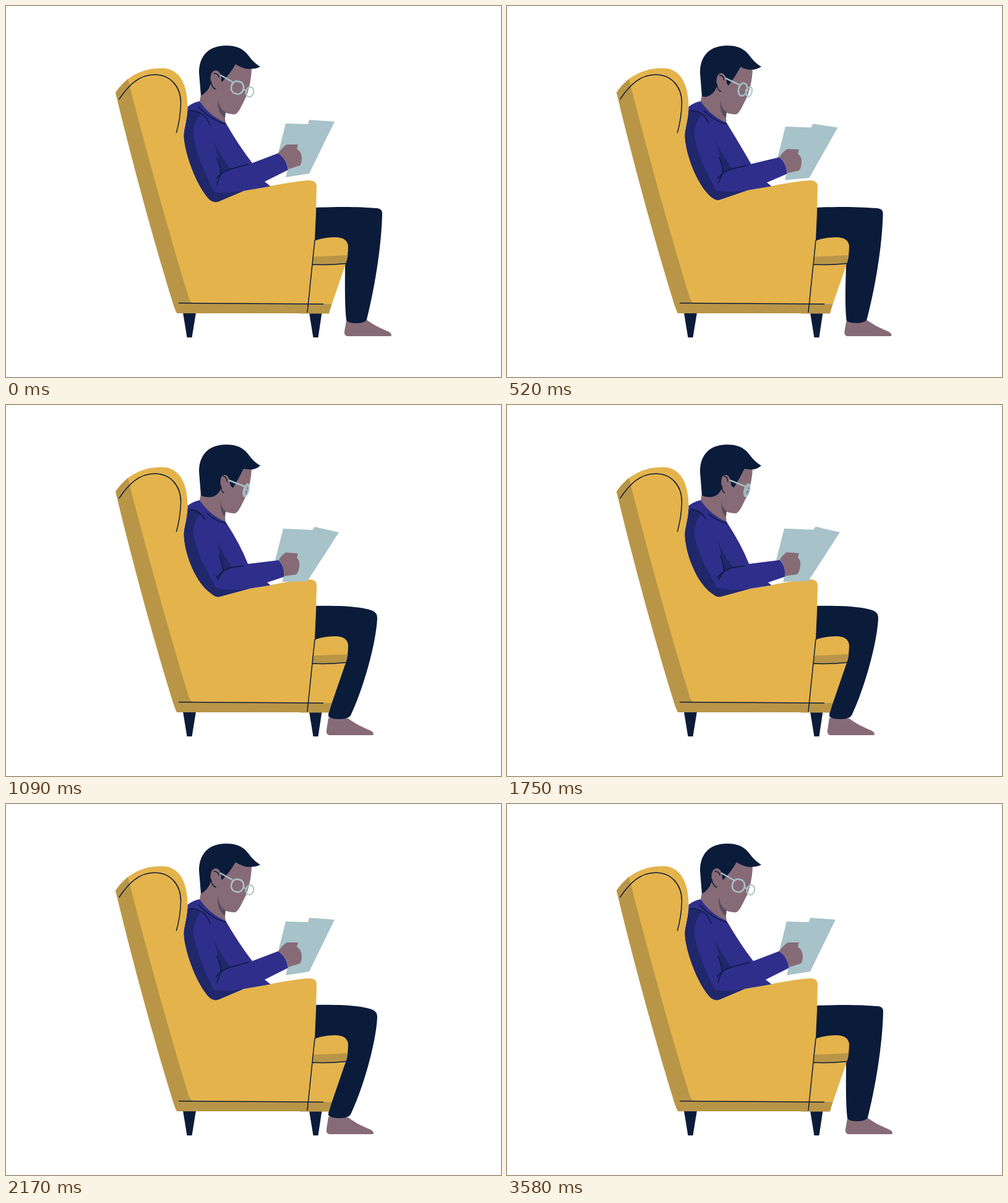
Write an HTML page that moves like this. It is 800 px wide and 600 px high and loops after 3.7 s.

```html
<!DOCTYPE html>
<html lang="en">
<head>
<meta charset="utf-8">
<title>Reading in an armchair</title>
<style>
  html, body { margin: 0; width: 100%; height: 100%; overflow: hidden; background: #fff; }
  svg { display: block; width: 100vw; height: 100vh; }
</style>
</head>
<body>
<svg id="stage" viewBox="0 0 800 600"></svg>
<script>
const LOOP = 3700;
const NAVY = '#0b1b3a', YELLOW = '#e4b34c', OCHRE = '#b99647', SKIN = '#866b76',
      BLUE = '#2f2e8b', INDIGO = '#20276b', PAPER = '#a7c2c9', SHADE = '#584e61';
const stage = document.getElementById('stage');
const moving = [];

// In a path, "a>b" is a coordinate that runs from a to b with its pose value.
function add(d, attrs, pose) {
  const el = document.createElementNS('http://www.w3.org/2000/svg', 'path');
  for (const key in attrs) el.setAttribute(key, attrs[key]);
  stage.appendChild(el);
  if (pose) moving.push({ el, d, pose });
  else el.setAttribute('d', d);
}
const fill = (color, d, pose) => add(d, { fill: color }, pose);
const line = (color, width, d, pose) => add(d, {
  fill: 'none', stroke: color, 'stroke-width': width, 'stroke-linecap': 'round', 'stroke-linejoin': 'round'
}, pose);

function morph(d, k) {
  return d.replace(/([\d.]+)>([\d.]+)/g, (_, a, b) => (+a + (b - a) * k).toFixed(2));
}

// Foot and trouser leg
fill(SKIN, `M550>521 509>506 L582>553 507 C594>565 516 607>578 522 617>588 526
  Q623>594 529 623>594 532 L622>593 534 L551>522 534 Q546>517 532 547>518 526 Z`, 'leg');
fill(NAVY, `M499 326>325 C545>550 324 575>578 325>327 600>593 327>333 Q608>600 328>336 608>600 335>345
  C607>598 390>388 595>576 460>463 583>557 507>502 Q580>553 513>508 566>540 513>508
  Q552>523 513>508 550>521 508>503 C547>522 480 548>536 445 548>549 417 L545 400 L497 400 Z`, 'leg');

// Armchair
fill(NAVY, 'M286 496 H307 L300.5 536 H292.5 Z M490 496 H510.500 L504.500 536 H496.500 Z');
fill(YELLOW, 'M495 381 Q512 374 530 374 Q551 373 553 388 Q553 406 548 420 L526 484 L480 490 Z');
fill(OCHRE, 'M494 405.500 L552.500 403 Q551.500 411 549 417 Q520 419.500 493 418 Z');
fill(YELLOW, `M177 140 Q185 128 197 118 C215 105 232 100.500 252 100.500 C280 101 293 125 293.500 163
  C294 180 288 198 287 208 L340 300 L393 297 L428 291 Q464 284 488 282 Q502 281 502 292
  L501 335 L499 379 L489 484 L300 486 L262 455 Z`);
fill(OCHRE, `M177 140 Q185 128 197 118 C227 236 264 369 293 464 Q297 480 303 481 L526.500 482
  L522 497.500 H475 V497 H276 Q272 489 268 475 C243 394 206 262 177 140 Z`);
line(NAVY, 1.5, 'M183 150.500 C198 128 215 111 241 111 C264 111 283 129 282.500 158 C282 175 279 192 275.500 204.500');
line(NAVY, 1.5, 'M279.500 480.500 L512.500 482 M499 379 L487 495.500 M495 418 Q520 419.500 549 416.500');

// Sheets of paper
fill(PAPER, `M452>448 190>200 L488>495 191>202 L490>499 184>197 L531>538 187>206
  L490>487 271>285 L452>446 277>286 L456>449 262>276 L440>435 238>251 Z`, 'body');

// Neck and face
fill(SKIN, `M316 138 L313 154 Q326 178 355 191 L353 172 Q362 176 371 175 Q376 172 381 161
  L388 147 C394 130 397 115 397 97 L372 88 L350 98 L325 120 Z`);
fill(SHADE, 'M342.500>347 149>154 Q344>347 166 355 171.500 L354 181 Q340>345 172>174 342.500>347 149>154 Z', 'body');

// Sweater
fill(BLUE, `M293.500 163 Q302 156 313 154 Q329 178 355 189 Q377>379 227>226 398>391 254>257
  L440>441 238>251 Q453>451 247>262 456>449 265>278 L418>422 284>287 L427.500 291.500
  L384>393 299>297 L344>347 316>309.500 Q337>340 319>312 330>333 314>306
  C308>304 293>287 287.500 235 287.500 208 C288 198 294 180 293.500 163 Z`, 'body');
fill(INDIGO, `M293.500 169 Q307 167 315 175 Q303 187 303 206 C304 232 320>322 268>264 336>339 301>295
  Q356>361 304>302 384>393 299>297 L344>347 316>309.500 Q337>340 319>312 330>333 314>306
  C308>304 293>287 287.500 235 287.500 208 C288 198 293 185 293.500 169 Z`, 'body');
fill(INDIGO, `M334>340 217 Q348>350 245>243 363>366 264>263 Q354>357 267>265 347>351 272>269
  Q345>347 246>244 334>340 217 Z`, 'body');
line(NAVY, 1.5, `M392>384 256>260 L362>364 264>263 Q348>350 269>267 340 279
  M341>342 289>283 Q343>346 280>274 347.500>351 272>269 Q347>350 261>257 341>345 246>243
  M297 169 Q322>312 170 330>321 193>184
  M311>325 163>175 Q332>338 185>188 355 191`, 'body');

// Hand
fill(SKIN, `M440>441 238>250 Q449>447 226>241 454>452 224>238.500 L472 224>240 L470 231>247
  Q478>475 236>251 478>474 246>260 Q478>473 254>270 475>469 258>274 L456>449 264>277
  Q453>450 247>260 440>441 238>250 Z`, 'body');

// Hair and ear
fill(NAVY, `M315 145>146 L312 108 C312 80 328 64 356 64 C382 64 389.500 77 396.500 86 Q404 94.500 411 98
  Q402 103>106 388>391 101.500>104 Q378>387 99>104 371>384 94>103 Q362>376 110>119 349>367 123>134
  L340>355 115>125 L331>347 125>136 Q327>341 139>149 315>328 145>149 Q315>319 145>149 315 145>146 Z`, 'body');
fill(SKIN, `M348>362 121>127 Q348>361 104>113 338>353 104>113 Q330>346 106>114 330.500>346.500 119>127
  Q332>347 132>140 339>352 136>143 L353>366 130>139 Z`, 'body');
line(NAVY, 1.5, `M336>351 109>115 Q343>357 109>116 344>357 115>124
  M331>347 122>130 Q333>348 133>141 339>352 134.500>142`, 'body');

// Glasses
line(PAPER, 2.5, `M347>361 112>122 L368>386 124>132 M383>388 136>137 Q386>388 135>136 389 137
  M376.600>390.600 122.300>128.100 A8.500>3.700 10.200 15 1 1 371.400>385.400 141.700>147.900
  A8.500>3.700 10.200 15 1 1 376.600>390.600 122.300>128.100 Z`, 'body');
line(PAPER, 2, `M396>391 131.200>130.800 A5.800>2.200 8 15 1 1 391.800>386.900 146.600>146.200
  A5.800>2.200 8 15 1 1 396>391 131.200>130.800 Z`, 'body');

function ease(t, from, to) {
  const x = Math.min(1, Math.max(0, (t - from) / (to - from)));
  return x * x * (3 - 2 * x);
}

function render(t) {
  const pose = {
    body: ease(t, 70, 970) - ease(t, 1720, 2170),
    leg: ease(t, 430, 1090) - ease(t, 3250, 3580)
  };
  for (const part of moving) part.el.setAttribute('d', morph(part.d, pose[part.pose]));
}

function tick() {
  render(performance.now() % LOOP);
  requestAnimationFrame(tick);
}
tick();
</script>
</body>
</html>
```
